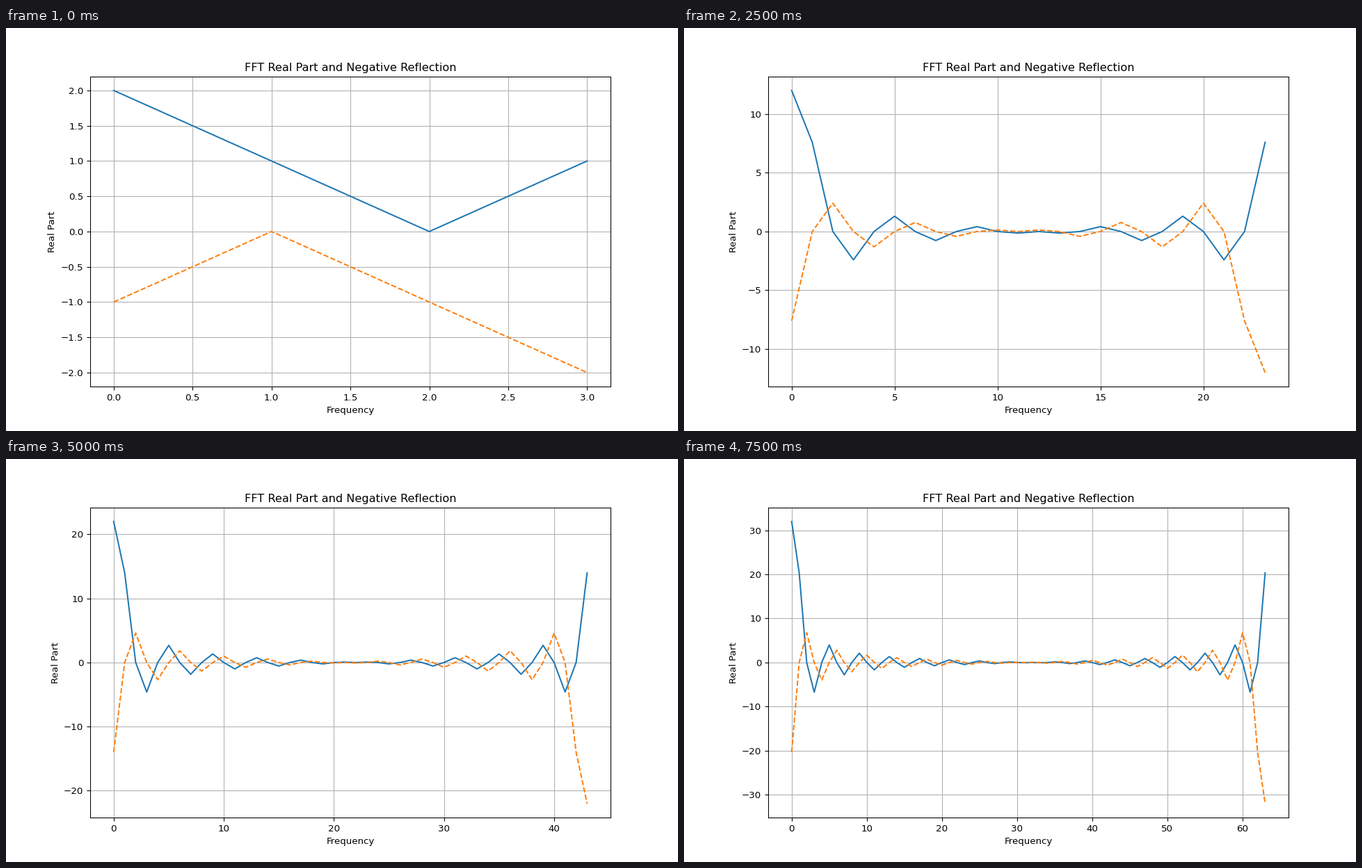
A matplotlib script for the animation above (8000 ms loop, 966x580 px).

```python
import numpy as np
import matplotlib.pyplot as plt
from matplotlib.animation import FuncAnimation

FRAMES = 16
INTERVAL = 500

# 966 x 580 pixels
fig, ax = plt.subplots(figsize=(10, 6.0042), dpi=96.6)


def square_wave(n):
    """One period of a pulse that is high in its first and last quarter."""
    k = np.arange(n)
    return ((k < n // 4) | (k >= 3 * n // 4)).astype(float)


def update(frame):
    real = np.fft.fft(square_wave(4 * (frame + 1))).real
    ax.clear()
    ax.plot(real)
    ax.plot(-real[::-1], linestyle="--")
    ax.set_title("FFT Real Part and Negative Reflection")
    ax.set_xlabel("Frequency")
    ax.set_ylabel("Real Part")
    ax.grid(True)


anim = FuncAnimation(fig, update, frames=FRAMES, interval=INTERVAL,
                     init_func=lambda: None, repeat=True, repeat_delay=0)
plt.show()
```
